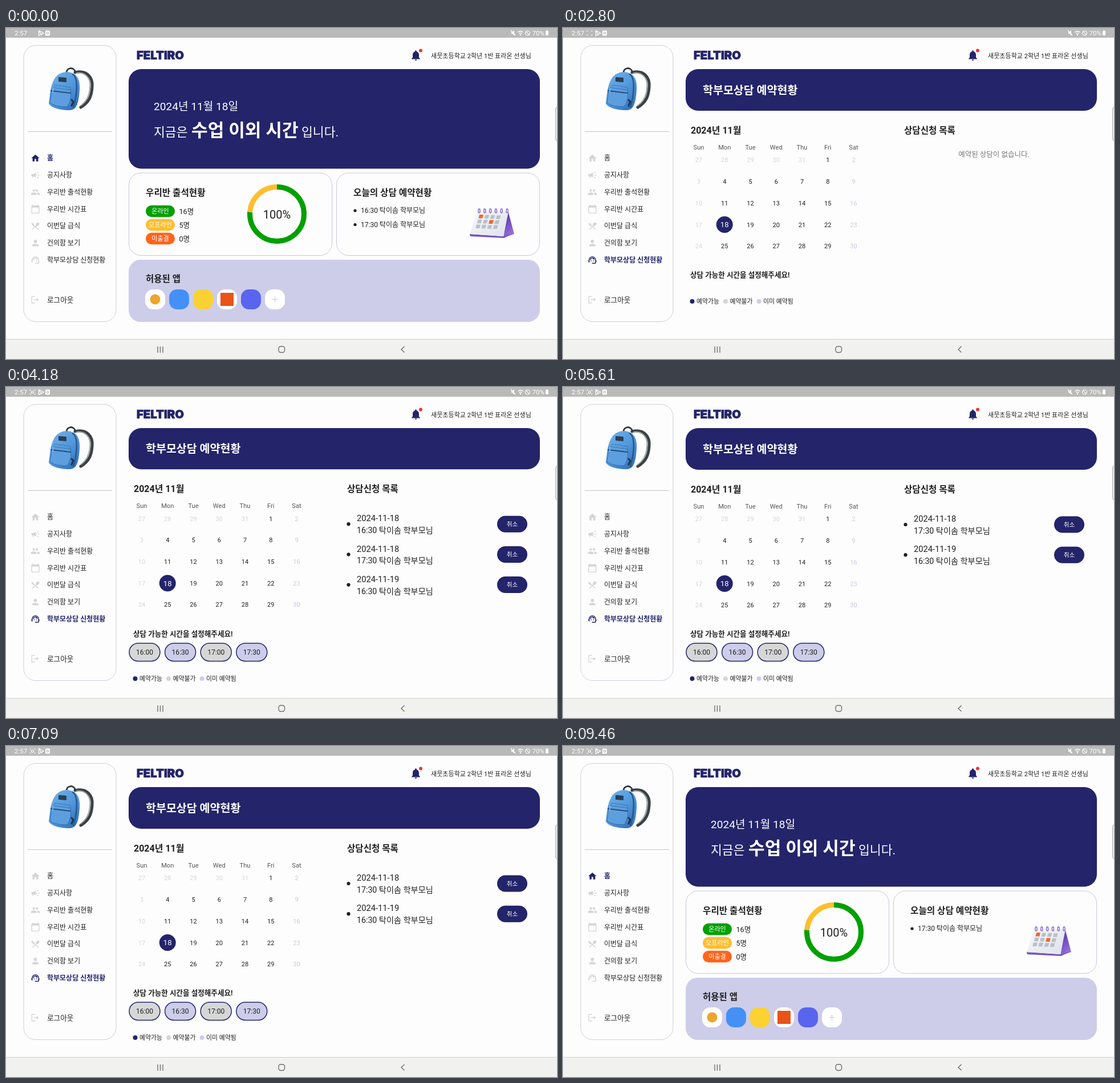
Write an HTML page with a canvas that moves like this. It is 966x580 px and loops after 9.63 s.

```html
<!DOCTYPE html>
<html lang="ko">
<head>
<meta charset="utf-8">
<title>학부모상담 예약현황</title>
<style>
  html, body { margin: 0; width: 100%; height: 100%; overflow: hidden; background: #fdfdfd; }
  canvas { display: block; width: 966px; height: 580px; }
</style>
</head>
<body>
<canvas id="stage"></canvas>
<script>
const W = 966, H = 580, LOOP = 9630;
const TIMES = { indicator: 270, openPage: 2690, loaded: 2970, dot: 3460, pull: 3680, pullEnd: 4340, cancelled: 5220, goHome: 7540 };
const NAVY = '#23246a', LAVENDER = '#cdcdea', GREY = '#d5d5d5', INK = '#202020';
const FONT = 'Roboto, "Noto Sans CJK KR", "Noto Sans CJK", sans-serif';
const PARENT = '탁이솜 학부모님';

const canvas = document.getElementById('stage');
const ctx = canvas.getContext('2d');
const ratio = window.devicePixelRatio || 1;
canvas.width = W * ratio;
canvas.height = H * ratio;

const ICONS = {
  home: 'M10 20v-6h4v6h5v-8h3L12 3 2 12h3v8z',
  horn: 'M18 11v2h4v-2zM16 17.6l3.2 2.4 1.2-1.6-3.2-2.4zM20.4 5.6L19.2 4 16 6.4 17.2 8zM4 9a2 2 0 00-2 2v2a2 2 0 002 2h1v4h2v-4h1l5 3V6L8 9zM15.5 12A4.5 4.5 0 0014 8.6v6.8a4.5 4.5 0 001.5-3.4z',
  people: 'M16 11a3 3 0 100-6 3 3 0 000 6zM8 11a3 3 0 100-6 3 3 0 000 6zM8 13c-2.3 0-7 1.2-7 3.5V19h14v-2.5C15 14.2 10.3 13 8 13zM16 13l-1 .1c1.2.8 2 2 2 3.4V19h6v-2.5c0-2.3-4.7-3.5-7-3.5z',
  calendar: 'M20 3h-1V1h-2v2H7V1H5v2H4a2 2 0 00-2 2v16a2 2 0 002 2h16a2 2 0 002-2V5a2 2 0 00-2-2zM20 21H4V8h16z',
  meal: 'M8.1 13.3l2.8-2.8-7-7a4 4 0 000 5.7zM14.9 11.5c1.5.7 3.7.2 5.3-1.4 1.9-1.9 2.3-4.6.8-6.1s-4.2-1.1-6.1.8c-1.6 1.6-2.1 3.8-1.4 5.3L3.7 19.9l1.4 1.4 6.9-6.9 6.9 6.9 1.4-1.4-6.9-6.9z',
  person: 'M12 12a4 4 0 100-8 4 4 0 000 8zM12 14c-2.7 0-8 1.3-8 4v2h16v-2c0-2.7-5.3-4-8-4z',
  agent: 'M21 12.2C21 6.7 16.7 3 12 3s-9 3.7-9 9.3a2 2 0 00-1 1.7v2a2 2 0 002 2h1v-6.1a7 7 0 0114 0V19h-8v2h8a2 2 0 002-2v-1.2a2 2 0 001-1.7v-2.3a2 2 0 00-1-1.6zM18 11C17.5 8.2 15 6 12 6c-3 0-6.3 2.5-6 6.5 2.5-1 4.3-3.2 4.9-5.9 1.3 2.6 4 4.4 7.1 4.4zM8 13h2v2H8zM14 13h2v2h-2z',
  logout: 'M17 8l-1.4 1.4 1.6 1.6H9v2h8.2l-1.6 1.6L17 16l4-4zM5 5h7V3H3v18h9v-2H5z',
  bell: 'M12 22a2 2 0 002-2h-4a2 2 0 002 2zM18 16v-5c0-3.1-1.6-5.6-4.5-6.3V4a1.5 1.5 0 00-3 0v.7C7.6 5.4 6 7.9 6 11v5l-2 2v1h16v-1z'
};
for (const name in ICONS) ICONS[name] = new Path2D(ICONS[name]);

const MENU = [
  ['home', '홈'], ['horn', '공지사항'], ['people', '우리반 출석현황'], ['calendar', '우리반 시간표'],
  ['meal', '이번달 급식'], ['person', '건의함 보기'], ['agent', '학부모상담 신청현황']
];

// y is the optical middle of the line.
function text(str, x, y, size, color = INK, weight = 400, align = 'left', font = FONT) {
  ctx.font = `${weight} ${size}px ${font}`;
  ctx.textAlign = align;
  ctx.fillStyle = color;
  ctx.fillText(str, x, y + size * 0.36);
}

function box(x, y, w, h, r, fill, stroke, line = 1) {
  ctx.beginPath();
  ctx.roundRect(x, y, w, h, r);
  paint(fill, stroke, line);
}

function dot(x, y, r, fill, stroke, line) {
  ctx.beginPath();
  ctx.arc(x, y, r, 0, Math.PI * 2);
  paint(fill, stroke, line);
}

function shape(d, fill, stroke, line) {
  const path = new Path2D(d);
  paint(fill, stroke, line, path);
}

function paint(fill, stroke, line = 1, path) {
  if (fill) { ctx.fillStyle = fill; path ? ctx.fill(path) : ctx.fill(); }
  if (stroke) {
    ctx.strokeStyle = stroke;
    ctx.lineWidth = line;
    path ? ctx.stroke(path) : ctx.stroke();
  }
}

function icon(name, x, y, size, color) {
  ctx.save();
  ctx.translate(x - size / 2, y - size / 2);
  ctx.scale(size / 24, size / 24);
  ctx.fillStyle = color;
  ctx.fill(ICONS[name], 'evenodd');
  ctx.restore();
}

function gradient(x0, y0, x1, y1, ...colors) {
  const g = ctx.createLinearGradient(x0, y0, x1, y1);
  colors.forEach((c, i) => g.addColorStop(i / (colors.length - 1), c));
  return g;
}

function statusBar(t) {
  ctx.fillStyle = '#b9b9b9';
  ctx.fillRect(0, 0, W, 17);
  text('2:57', 15, 9, 11.5, '#fff');
  if (t >= TIMES.indicator) {
    shape('M42 7V5h2M49 5h2v2M51 11v2h-2M44 13h-2v-2', null, '#f4f4f4', 1);
    if (t >= TIMES.dot) dot(46.5, 9, 2, null, '#fff', 1.2);
  }
  shape('M57.5 4.5L66 9l-8.5 4.5zM57.5 4.5l5 8', null, '#fff', 1.3);
  box(69, 4.5, 8, 9, 1.5, '#fff');
  dot(73, 9, 1.8, null, '#aaa', 1);
  shape('M886 7h2l3-3v9l-3-3h-2z', '#fff');
  shape('M885 4l8 9', null, '#fff', 1.2);
  shape('M897.5 7.5q4.500-4 9 0M899.5 10q2.500-2.200 5 0', null, '#fff', 1.3);
  dot(902, 12, 1.2, '#fff');
  dot(914.5, 9, 4, null, '#fff', 1.2);
  shape('M911.700 6.200l5.600 5.600', null, '#fff', 1.2);
  text('70%', 922.5, 9, 11.5, '#fff');
  box(946, 5, 5, 8, 1, '#fff');
  ctx.fillRect(947.5, 4, 2, 1);
}

function navBar() {
  ctx.fillStyle = '#f1f1f0';
  ctx.fillRect(0, 545, W, 35);
  ctx.fillStyle = '#cfcfcf';
  ctx.fillRect(0, 545, W, 1);
  shape('M266 558v11M270.500 558v11M275 558v11', null, '#707070', 1.4);
  box(478, 558, 10.5, 10.5, 3.5, null, '#707070', 1.4);
  shape('M698.500 558l-5.500 5.300 5.500 5.300', null, '#707070', 1.4);
  box(963.5, 138, 8, 60, 4, '#eeeeee', '#aaaaaa');
}

function backpack() {
  ctx.lineCap = ctx.lineJoin = 'round';
  shape('M121 78C141 73 153 86 151 104C150 119 146 130 131 139', null, '#3b4047', 5);
  shape('M122 79C139 76 150 88 147 106C146 119 141 129 131 136', null, '#9aa39b', 2);
  shape('M106 79C106 69 119 67 122 78', null, '#303844', 3);
  shape('M75 132C77 119 77 102 85 89C92 77 108 74 118 80C129 85 131 100 128 119C126 137 121 145 109 144C96 144 78 140 75 132Z',
    gradient(76, 85, 128, 140, '#6fb0e6', '#5297da', '#2f6db5'));
  shape('M117 81C128 88 124 120 118 139', null, '#27568c', 2.5);
  shape('M81 104L113 109C115 119 113 129 108 137C97 139 82 136 77 131Z', '#5d9fde', '#3777bb', 1.2);
  shape('M79 110L113 114', null, '#244d7a', 2);
  shape('M80 107L86 100L113 104L114 113', null, '#3878b9', 1);
  shape('M93 87L105 88L105 94L93 93Z', '#293f59', '#293f59', 2);
  shape('M115 126L118 129L115 136', null, '#1d344e', 3);
  shape('M82 104L82 113', null, '#8bc5ef', 1.5);
  ctx.lineCap = 'butt';
  ctx.lineJoin = 'miter';
}

function sidebar(active) {
  box(31, 30.5, 162, 484, 21, null, '#cecedc');
  backpack();
  ctx.fillStyle = '#c5c5c9';
  ctx.fillRect(38, 181, 148, 1);
  MENU.forEach(([name, label], i) => {
    const y = 228 + i * 29.75, on = name === active;
    icon(name, 51.5, y, 17, on ? NAVY : GREY);
    text(label, 72, y, 12, on ? NAVY : INK, on ? 700 : 400);
  });
  icon('logout', 51, 476, 17, GREY);
  text('로그아웃', 72, 476, 12.6);
}

function header() {
  text('FELTIRO', 229, 48, 20.3, NAVY, 900, 'left', 'Inter, sans-serif');
  ctx.strokeStyle = NAVY;
  ctx.lineWidth = 0.7;
  ctx.strokeText('FELTIRO', 229, 48 + 20.3 * 0.36);
  icon('bell', 718.5, 48, 22, NAVY);
  dot(727, 39.5, 3, '#f03434');
  text('새뭇초등학교 2학년 1반 표라온 선생님', 745, 49, 11.05);
}

function deskCalendar() {
  shape('M880 320L891 361L872 367Z', gradient(873, 340, 891, 360, '#6844b5', '#9a74df'));
  shape('M813 361L872 365L890 360L873 368L814 365Z', '#7552c4');
  shape('M826 320L881 321L872 365L813 361Z', gradient(826, 320, 865, 365, '#f5f6f8', '#e2e4eb'));
  for (let row = 0; row < 3; row++) for (let col = 0; col < 4; col++) {
    const hot = row === 0 && col === 0 || row === 1 && col === 2;
    const x = 830 + col * 10.2 - row * 2.6, y = 327 + row * 8.7 + col * 0.4;
    shape(`M${x} ${y}h7l-1.600 6.500h-7z`, hot ? '#f26432' : '#b9c0c9');
  }
  for (let i = 0; i < 6; i++) {
    box(828 + i * 9.8, 317, 3, 7, 1.5, null, '#7958c1', 1.3);
  }
}

function ring() {
  const start = -Math.PI / 2, split = start + Math.PI * 2 * 16 / 21;
  const arc = (from, to, color) => {
    ctx.beginPath();
    ctx.arc(475, 326, 47.5, from, to);
    paint(null, color, 9);
  };
  arc(start, split, '#00a000');
  arc(split, start + Math.PI * 2, '#ffbe2d');
  text('100%', 475, 326.5, 20, INK, 400, 'center');
}

function home(meetings) {
  box(215, 72, 721, 174.5, 22, NAVY);
  text('2024년 11월 18일', 259, 137.5, 19.1, '#fff');
  text('지금은', 259, 182, 21.6, '#fff');
  text('수업 이외 시간', 325, 179, 31.2, '#fff', 700);
  text('입니다.', 518, 182, 21.6, '#fff');

  for (const x of [215.5, 579.5]) box(x, 254, 356, 144.5, 21, null, '#c6c6e5');
  text('우리반 출석현황', 245, 288.5, 15.65, INK, 700);
  [['온라인', '16명', '#00a000'], ['오프라인', '5명', '#ffbe2d'], ['미출결', '0명', '#ff641c']].forEach(([label, count, color], i) => {
    const y = 321 + i * 24;
    box(245, y - 10.2, 51, 20.4, 10.2, color);
    text(label, 270.5, y, 11.1, '#fff', 400, 'center');
    text(count, 303.5, y, 12.6);
  });
  ring();

  text('오늘의 상담 예약현황', 609, 288.5, 15.65, INK, 700);
  meetings.forEach((time, i) => {
    dot(612, 320 + i * 24.5, 2.6, INK);
    text(`${time} ${PARENT}`, 622, 320 + i * 24.5, 12);
  });
  deskCalendar();

  box(215, 406, 721, 109, 21, LAVENDER);
  text('허용된 앱', 245, 439.5, 15.5, INK, 700);
  ['#fff', '#4490f7', '#fbd231', '#fff', '#5965ee', '#fff'].forEach((color, i) => box(244 + i * 42, 458, 35, 35, 14, color));
  dot(261.5, 475.5, 9, '#eda52c');
  box(376, 464, 23, 23, 0, '#ea5318');
  shape('M466.500 475.500h10M471.500 470.500v10', null, '#cccccc', 1.2);
}

function monthView() {
  text('2024년 11월', 224, 179, 16, INK, 700);
  ['Sun', 'Mon', 'Tue', 'Wed', 'Thu', 'Fri', 'Sat'].forEach((day, i) => text(day, 238 + i * 45.25, 209, 11.1, '#555', 400, 'center'));
  for (let i = 0; i < 35; i++) {
    const col = i % 7, x = 238 + col * 45.25, y = 231.5 + Math.floor(i / 7) * 37.7;
    const day = i < 5 ? 27 + i : i - 4;
    const today = day === 18;
    const color = today ? '#fff' : col === 6 ? '#c9c9e1' : i < 5 || col === 0 ? GREY : INK;
    if (today) dot(x, y, 14.5, NAVY);
    text(day, x, y, today ? 13.2 : 11, color, 400, 'center');
  }
}

function requests(rows) {
  text('상담신청 목록', 598, 179, 15.6, INK, 700);
  if (!rows.length) text('예약된 상담이 없습니다.', 755.5, 221.5, 12.5, '#777', 400, 'center');
  rows.forEach(([date, time], i) => {
    const y = 241 + i * 53.2;
    dot(600.5, y, 3.1, INK);
    text(date, 615, y - 10, 14.7);
    text(`${time} ${PARENT}`, 615, y + 11, 14.2);
    box(861, y - 14.5, 53, 29, 14.5, NAVY);
    text('취소', 887.5, y, 10.6, '#fff', 400, 'center');
  });
}

function consulting(t) {
  const loaded = t >= TIMES.loaded;
  const pull = t > TIMES.pull && t < TIMES.pullEnd
    ? 1.2 * Math.sin(Math.PI * (t - TIMES.pull) / (TIMES.pullEnd - TIMES.pull)) : 0;
  const bookings = [['2024-11-18', '16:30'], ['2024-11-18', '17:30'], ['2024-11-19', '16:30']];

  box(215, 72, 721, 73 - pull, 22, NAVY);
  ctx.save();
  ctx.translate(0, -pull);
  text('학부모상담 예약현황', 245, 109, 19.5, '#fff', 700);
  monthView();
  requests(loaded ? bookings.slice(t >= TIMES.cancelled ? 1 : 0) : []);
  ctx.restore();

  text('상담 가능한 시간을 설정해주세요!', 223, 432, 12.55, INK, 700);
  if (loaded) ['16:00', '16:30', '17:00', '17:30'].forEach((time, i) => {
    const x = 216 + i * 62.6;
    box(x, 449, 54, 31.5, 15.7, i % 2 ? LAVENDER : '#d7d7d7', NAVY, 1.5);
    text(time, x + 27, 464.5, 12.1, INK, 400, 'center');
  });
  const y = loaded ? 511 : 479;
  [['예약가능', NAVY], ['예약불가', GREY], ['이미 예약됨', LAVENDER]].forEach(([label, color], i) => {
    dot(226.5 + i * 58.5, y, 4, color);
    text(label, 234 + i * 58.5, y, 10.9);
  });
}

function draw(now) {
  const t = now % LOOP;
  const booking = t >= TIMES.openPage && t < TIMES.goHome;
  ctx.setTransform(ratio, 0, 0, ratio, 0, 0);
  ctx.fillStyle = '#fdfdfd';
  ctx.fillRect(0, 0, W, H);
  sidebar(booking ? 'agent' : 'home');
  header();
  if (booking) consulting(t);
  else home(t < TIMES.openPage ? ['16:30', '17:30'] : ['17:30']);
  statusBar(t);
  navBar();
}

const begin = performance.now();
function tick() {
  draw(performance.now() - begin);
  requestAnimationFrame(tick);
}
tick();
</script>
</body>
</html>
```
